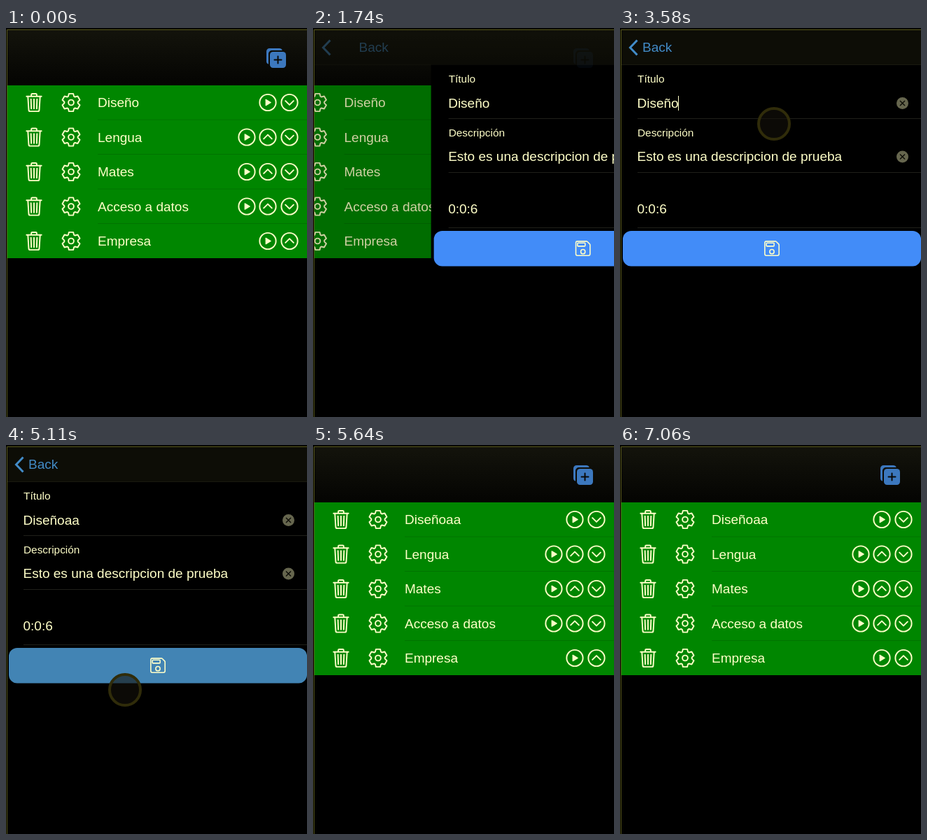
An HTML page that plays this animation: 430x556 px, repeating every 7160 ms.

```html
<!DOCTYPE html>
<html lang="es">
<head>
<meta charset="utf-8">
<style>
html, body { margin: 0; width: 100%; height: 100%; overflow: hidden; background: #000; }
svg { display: block; width: 430px; height: 556px; }
text { font: 19px "Liberation Sans", Arial, sans-serif; fill: #ffffc8; }
.label { font-size: 15.4px; }
.icon { fill: none; stroke: #ffffc8; stroke-width: 32; stroke-linecap: round; stroke-linejoin: round; }
.solid { fill: #ffffc8; stroke: none; }
</style>
</head>
<body>
<svg viewBox="0 0 430 556">
  <defs>
    <linearGradient id="bar" x2="0" y2="1">
      <stop stop-color="#14140c"/><stop offset="1" stop-color="#040402"/>
    </linearGradient>
    <g id="trash">
      <path d="M112 112l20 320c1 18 14 32 32 32h184c18 0 31-14 32-32l20-320M80 112h352M192 112V72a24 24 0 0 1 24-24h80a24 24 0 0 1 24 24v40M256 176v224M184 176l8 224M328 176l-8 224"/>
    </g>
    <g id="gear"><circle cx="256" cy="256" r="64"/><path id="teeth"/></g>
    <g id="play">
      <circle cx="256" cy="256" r="192"/>
      <path class="solid" d="M216 334l115-69a11 11 0 0 0 0-18l-115-69a11 11 0 0 0-16 9v138a11 11 0 0 0 16 9z"/>
    </g>
    <g id="up"><circle cx="256" cy="256" r="192"/><path d="M352 296l-96-96-96 96"/></g>
    <g id="down"><circle cx="256" cy="256" r="192"/><path d="M352 216l-96 96-96-96"/></g>
    <g id="save">
      <path d="M381 57a32 32 0 0 0-23-9H94a46 46 0 0 0-46 46v324a46 46 0 0 0 46 46h324a46 46 0 0 0 46-46V154a32 32 0 0 0-9-23z"/>
      <circle cx="256" cy="352" r="64"/><rect x="96" y="96" width="224" height="96" rx="16"/>
    </g>
    <g id="clear">
      <circle r="8.5" fill="#66664e"/>
      <path d="M-3.5-3.5l7 7m0-7l-7 7" stroke="#0c0c06" stroke-width="1.4"/>
    </g>
  </defs>

  <rect width="430" height="82" fill="url(#bar)"/>
  <g id="list"><rect y="82" width="430" height="247" fill="#008600"/></g>

  <g id="detail">
    <rect y="52" width="432" height="504"/>
    <path d="M25 129.5H430M25 206.5H430M25 285.5H430" stroke="#20201a"/>
    <text class="label" x="25" y="78">Título</text>
    <text id="title" x="24.5" y="114">Diseño</text>
    <rect id="caret" y="97" width="1" height="21" fill="#ffffc8"/>
    <text class="label" x="25" y="155">Descripción</text>
    <text x="24.5" y="190">Esto es una descripcion de prueba</text>
    <text x="24.5" y="265">0:0:6</text>
    <use href="#clear" x="403.5" y="107.5"/>
    <use href="#clear" x="403.5" y="184"/>
    <rect id="button" x="4" y="290" width="426" height="50.5" rx="12"/>
  </g>

  <g id="nav">
    <rect width="430" height="52" fill="#0d0d06"/>
    <path d="M0 52.5H430" stroke="#1a1a10"/>
    <path d="M24.5 17.5L14.5 28l10 10.5" fill="none" stroke="#428cc8" stroke-width="3"/>
    <text id="back" x="32" y="34" style="fill:#428cc8">Back</text>
  </g>

  <g id="add" transform="translate(370 27) scale(.0625)" fill="#3c78be">
    <rect x="112" y="112" width="368" height="368" rx="72"/>
    <path d="M396 80a72 72 0 0 0-68-48H104a72 72 0 0 0-72 72v224a72 72 0 0 0 48 68V160a80 80 0 0 1 80-80z"/>
    <path d="M216 296h160M296 216v160" stroke="#0a0a08" stroke-width="32" stroke-linecap="round"/>
  </g>

  <circle id="touch" r="22" fill="#14120a" fill-opacity=".6" stroke="#302c0a" stroke-width="4"/>
  <path d="M0 0H430V2H2V556H0z"/>
  <path d="M1.5 556V2.5H430" fill="none" stroke="#5a5a1c"/>
</svg>
<script>
const $ = id => document.getElementById(id);
const clamp = x => Math.min(1, Math.max(0, x));
const mix = (a, b, k) => a + (b - a) * k;

function icon(name, x, y, size = 31) {
  const s = size / 512;
  return `<use class="icon" href="#${name}" transform="translate(${x - size / 2} ${y - size / 2}) scale(${s})"/>`;
}

// six equal teeth around the centre
const tooth = [[-68, -145], [-50, -209], [50, -209], [68, -145]];
const points = [];
for (let i = 0; i < 6; i++) {
  const c = Math.cos(i * Math.PI / 3), s = Math.sin(i * Math.PI / 3);
  for (const [x, y] of tooth) points.push([256 + x * c - y * s, 256 + x * s + y * c]);
}
$('teeth').setAttribute('d', 'M' + points.join('L') + 'z');

const names = ['Diseño', 'Lengua', 'Mates', 'Acceso a datos', 'Empresa'];
let rows = '';
names.forEach((name, i) => {
  const y = 106.5 + i * 49.5, last = i === names.length - 1;
  rows += icon('trash', 40, y) + icon('gear', 93, y) + `<text x="131" y="${y + 6.5}">${name}</text>`;
  rows += icon('play', i && !last ? 344 : 374, y);
  if (i) rows += icon('up', last ? 405 : 374, y);
  if (!last) rows += icon('down', 405, y) + `<path d="M131 ${y + 24.5}H430" stroke="#007400"/>`;
});
$('list').insertAdjacentHTML('beforeend', rows);
$('detail').insertAdjacentHTML('beforeend', icon('save', 217, 315, 25));
const firstName = $('list').querySelector('text');

// cubic-bezier(.32, .72, 0, 1)
function ease(x) {
  let lo = 0, hi = 1;
  for (let i = 0; i < 24; i++) {
    const s = (lo + hi) / 2;
    if (.96 * (1 - s) ** 2 * s + s ** 3 < x) lo = s; else hi = s;
  }
  return 2.16 * (1 - lo) ** 2 * lo + 3 * (1 - lo) * lo * lo + lo ** 3;
}
const slide = (t, start) => t <= start ? 0 : t >= start + 540 ? 1 : ease((t - start) / 540);

// time, x, y
const drift = [[2580, 230, 143], [2690, 230, 143], [3060, 222, 138], [3430, 222, 138], [3580, 220, 137], [4000, 220, 137]];
const press = [[5010, 176, 325], [5110, 170, 350], [5180, 170, 350]];

function along(path, t) {
  for (let i = 1; i < path.length; i++) {
    const [t0, x0, y0] = path[i - 1], [t1, x1, y1] = path[i];
    if (t >= t0 && t < t1) {
      const k = (t - t0) / (t1 - t0);
      return [mix(x0, x1, k), mix(y0, y1, k)];
    }
  }
}

function draw(now) {
  const t = now % 7160;
  const p = t < 4000 ? slide(t, 1640) : 1 - slide(t, 5125);
  const typed = t < 4000 ? 0 : t < 4110 ? 1 : 2;

  $('list').setAttribute('transform', `translate(${-.33 * 430 * p})`);
  $('list').setAttribute('opacity', 1 - .3 * p);
  $('detail').setAttribute('transform', `translate(${432 * (1 - p)})`);
  $('detail').style.display = p > 0 ? '' : 'none';
  $('nav').setAttribute('opacity', p * p);
  $('back').setAttribute('x', 32 + 86 * (1 - p));
  $('add').setAttribute('opacity', (1 - p) ** 3);

  $('title').textContent = firstName.textContent = names[0] + 'a'.repeat(typed);
  $('caret').setAttribute('x', 83 + 10.57 * typed);
  const caretOn = t >= 2560 && t < 3060 || t >= 3530 && t < 4740;
  $('caret').style.display = caretOn ? '' : 'none';
  $('button').setAttribute('fill', t >= 5060 ? '#4284b4' : '#428cf8');

  const spot = along(drift, t) || along(press, t);
  $('touch').style.display = spot ? '' : 'none';
  if (spot) $('touch').setAttribute('transform', `translate(${spot})`);
  requestAnimationFrame(draw);
}
draw(0);
</script>
</body>
</html>
```
